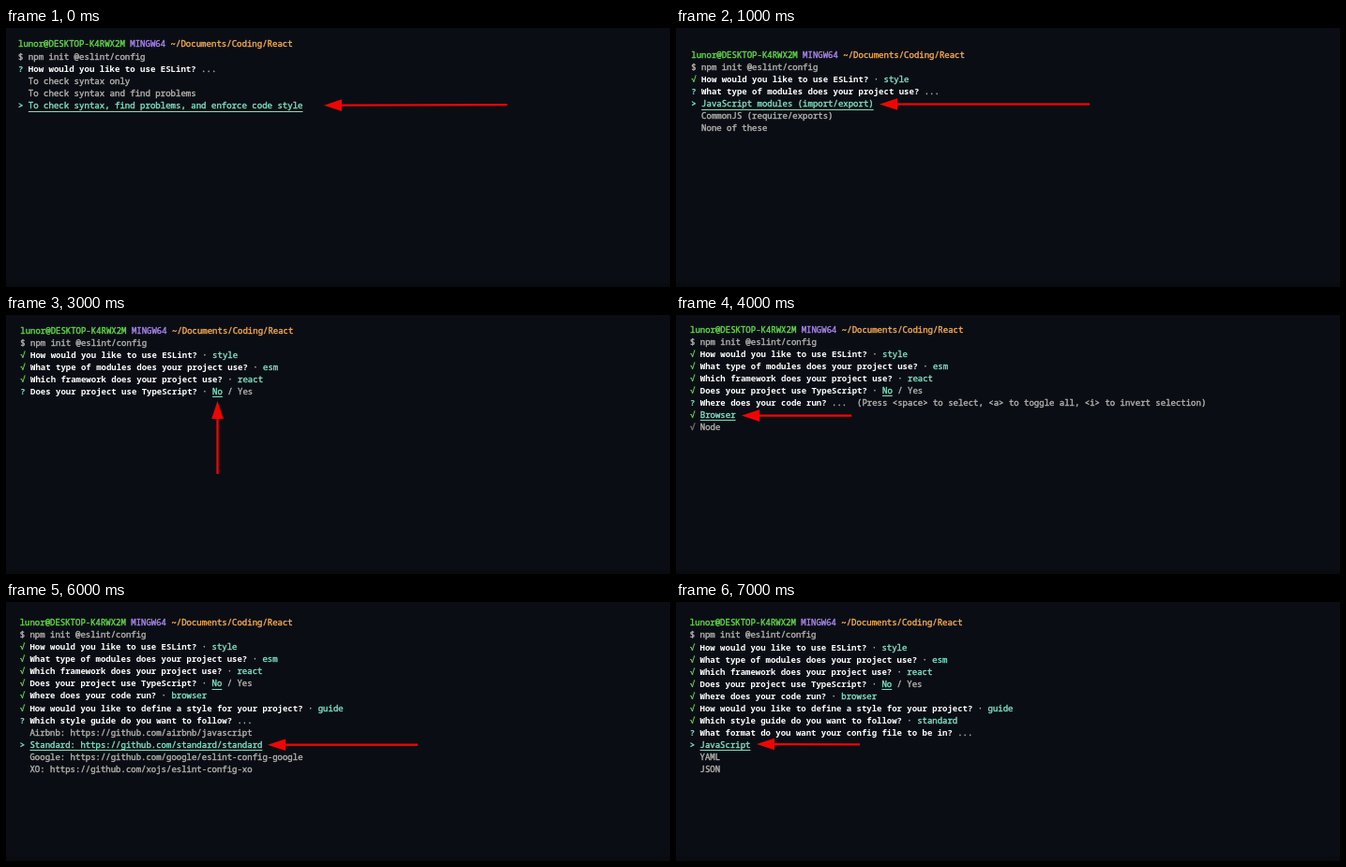
An HTML page with a canvas for the animation above (8000 ms loop, 708 by 277 pixels).

```html
<!DOCTYPE html>
<html lang="en">
<head>
<meta charset="utf-8">
<title>ESLint setup</title>
<style>
html, body { margin: 0; width: 100%; height: 100%; overflow: hidden; background: #0a0e14; }
canvas { display: block; }
</style>
</head>
<body>
<canvas id="stage" width="708" height="277"></canvas>
<script>
const ctx = document.getElementById('stage').getContext('2d');
const FONT = '90px "Noto Sans Mono", "DejaVu Sans Mono", monospace';
const FONT_PITCH = 54;
const STEP_MS = 1000;
const C = {
  bg: '#0a0e14', strip: '#080b10', text: '#b3b1ad', white: '#ffffff', cyan: '#7fe0c3',
  green: '#63d64a', purple: '#a985ea', orange: '#f4a950', dim: '#777777', red: '#f00505'
};

// A run is a piece of text in one style; a line is a list of runs.
const run = (text, color = C.text, style = '') => ({ text, color, style });
const question = text => run(text, C.white, 'bold');
const ask = (text, ...rest) => [run('? ', C.cyan, 'bold'), question(text), run(' ...'), ...rest];
const done = (text, ...answer) => [run('√ ', C.green, 'bold'), question(text), run(' · '), ...answer];
const answered = (text, answer) => done(text, run(answer, C.cyan));
const option = text => [run('  ' + text)];
const picked = text => [run('> ', C.cyan), run(text, C.cyan, 'underline')];
const noYes = [run('No', C.cyan, 'underline'), run(' / Yes')];

const Q = {
  use: 'How would you like to use ESLint?',
  modules: 'What type of modules does your project use?',
  framework: 'Which framework does your project use?',
  types: 'Does your project use TypeScript?',
  where: 'Where does your code run?',
  style: 'How would you like to define a style for your project?',
  guide: 'Which style guide do you want to follow?',
  format: 'What format do you want your config file to be in?'
};
const prompt = [
  [run('lunor@DESKTOP-K4RWX2M ', C.green), run('MINGW64 ', C.purple),
   run('~/Documents/Coding/React', C.orange)],
  [run('$ npm init @eslint/config')]
];
const history = [
  answered(Q.use, 'style'),
  answered(Q.modules, 'esm'),
  answered(Q.framework, 'react'),
  done(Q.types, ...noYes),
  answered(Q.where, 'browser'),
  answered(Q.style, 'guide'),
  answered(Q.guide, 'standard')
];

// x, y: first baseline; arrow: tip x, tip y, tail x, tail y
const steps = [
  { x: 13, y: 20.4, pitch: 5.42, leading: 13.2, arrow: [339, 82.7, 534, 82.2],
    lines: [ask(Q.use), option('To check syntax only'), option('To check syntax and find problems'),
      picked('To check syntax, find problems, and enforce code style')] },
  { x: 16.3, y: 32.2, pitch: 5.4, leading: 13, arrow: [217, 81.5, 441, 81.5],
    lines: [ask(Q.modules), picked('JavaScript modules (import/export)'),
      option('CommonJS (require/exports)'), option('None of these')] },
  { x: 16, y: 30, pitch: 5.4, leading: 13, arrow: [58, 92.3, 274, 92.3],
    lines: [ask(Q.framework), picked('React'), option('Vue.js'), option('None of these')] },
  { x: 15.3, y: 19.5, pitch: 5.39, leading: 13.03, arrow: [225.5, 92, 225.5, 170],
    lines: [[run('? ', C.cyan, 'bold'), question(Q.types), run(' · '), ...noYes]] },
  { x: 15, y: 18.6, pitch: 5.395, leading: 13.03, arrow: [70, 107.6, 187, 107.6],
    lines: [
      ask(Q.where, run('  (Press <space> to select, <a> to toggle all, <i> to invert selection)')),
      [run('√ ', C.green, 'bold'), run('Browser', C.cyan, 'underline')],
      [run('√ ', C.dim), run('Node')]] },
  { x: 14.6, y: 24.2, pitch: 5.39, leading: 13.1, arrow: [164, 125.2, 298, 125.2],
    lines: [ask(Q.style), picked('Use a popular style guide'),
      option('Answer questions about your style')] },
  { x: 14.7, y: 25, pitch: 5.39, leading: 13.08, arrow: [279, 152.7, 439, 152.7],
    lines: [ask(Q.guide), option('Airbnb: https://github.com/airbnb/javascript'),
      picked('Standard: https://github.com/standard/standard'),
      option('Google: https://github.com/google/eslint-config-google'),
      option('XO: https://github.com/xojs/eslint-config-xo')] },
  { x: 14.8, y: 25.4, pitch: 5.385, leading: 13.06, arrow: [86, 152, 196, 152.3],
    lines: [ask(Q.format), picked('JavaScript'), option('YAML'), option('JSON')] }
];

function drawRun({ text, color, style }, x, y, pitch) {
  const bold = style === 'bold';
  const scale = pitch / FONT_PITCH;
  ctx.fillStyle = ctx.strokeStyle = color;
  ctx.save();
  ctx.translate(x, y);
  ctx.scale(scale, scale);
  ctx.font = (bold ? 'bold ' : '') + FONT;
  ctx.fillText(text, 0, 0);
  if (!bold) {
    // A thin outline gives the regular weight its sturdier terminal look.
    ctx.lineWidth = 4;
    ctx.lineJoin = 'round';
    ctx.strokeText(text, 0, 0);
  }
  ctx.restore();
  if (style === 'underline') ctx.fillRect(x, Math.round(y + 2.4), text.length * pitch, 1);
}

function drawArrow([tipX, tipY, tailX, tailY]) {
  const dx = tailX - tipX, dy = tailY - tipY;
  const length = Math.hypot(dx, dy);
  ctx.save();
  ctx.translate(tipX, tipY);
  ctx.rotate(Math.atan2(dy, dx));
  ctx.fillStyle = C.red;
  ctx.fillRect(17, -1.15, length - 17, 2.3);
  ctx.beginPath();
  ctx.moveTo(0, 0);
  ctx.lineTo(19, -6.3);
  ctx.lineTo(19, 6.3);
  ctx.fill();
  ctx.restore();
}

function drawStep(index) {
  const { x, y, pitch, leading, arrow, lines } = steps[index];
  ctx.fillStyle = C.bg;
  ctx.fillRect(0, 0, 708, 277);
  ctx.fillStyle = C.strip;
  ctx.fillRect(0, 272, 708, 5);
  [...prompt, ...history.slice(0, index), ...lines].forEach((line, row) => {
    let column = 0;
    for (const part of line) {
      drawRun(part, x + column * pitch, y + row * leading, pitch);
      column += part.text.length;
    }
  });
  drawArrow(arrow);
}

function tick(now) {
  drawStep(Math.floor(now / STEP_MS) % steps.length);
  requestAnimationFrame(tick);
}
drawStep(0);
requestAnimationFrame(tick);
</script>
</body>
</html>
```
